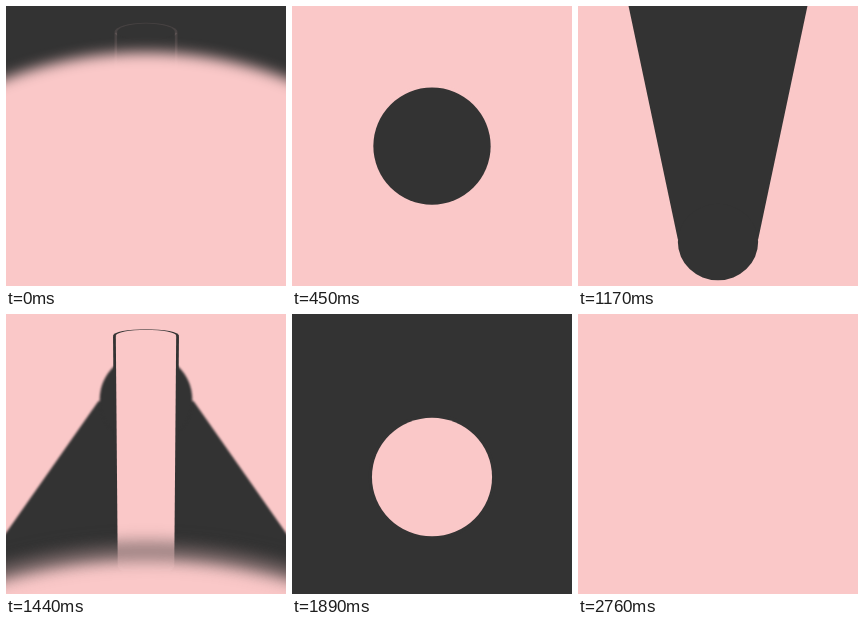
These frames come from a looping animation (280x280 px, 2820 ms). An HTML page with a canvas:

```html
<!DOCTYPE html>
<html lang="en">
<head>
<meta charset="utf-8">
<title>Tumbling cylinder</title>
<style>
html, body { margin: 0; width: 100%; height: 100%; overflow: hidden; background: #333; }
canvas { display: block; width: 280px; height: 280px; }
</style>
</head>
<body>
<canvas id="stage" width="280" height="280"></canvas>
<script>
const ctx = document.getElementById('stage').getContext('2d');
const DARK = '#333333', PINK = '#fac8c8';
const STEP = 30, HALF = 1410, COVERED = 480;
const MID = 140, FOCAL = MID / Math.tan(Math.PI / 9);

// The cylinder spins end over end while the camera closes in at one unit per ms.
const LENGTH = 663, RADIUS = 174, START = 2254, NEAR = 140;
const angleAt = t => (0.3 + 0.1994 * t) * Math.PI / 180;

// Perspective view of one end disc; side is 0 or 1
function endAt(t, side) {
  const angle = angleAt(t) + side * Math.PI;
  const sin = Math.sin(angle), cos = Math.cos(angle);
  const screenY = (y, depth) => MID + FOCAL * y / Math.max(1, depth);
  const depth = START - t - LENGTH * sin;
  const front = screenY(RADIUS * sin - LENGTH * cos, depth - RADIUS * cos);
  const back = screenY(-RADIUS * sin - LENGTH * cos, depth + RADIUS * cos);
  return {
    y: screenY(-LENGTH * cos, depth),
    cy: (front + back) / 2,
    rx: FOCAL * RADIUS / depth,
    ry: Math.abs(front - back) / 2,
    nearest: depth - RADIUS * Math.abs(cos),
    facing: front > back
  };
}

const endsAt = t => [endAt(t, 0), endAt(t, 1)];

function discPath(end, scale = 1) {
  ctx.beginPath();
  ctx.ellipse(MID, end.cy, end.rx * scale, end.ry * scale, 0, 0, 2 * Math.PI);
}

function fillDisc(end, color, scale) {
  discPath(end, scale);
  ctx.fillStyle = color;
  ctx.fill();
}

function strokeDisc(end, color, width) {
  discPath(end);
  ctx.strokeStyle = color;
  ctx.lineWidth = width;
  ctx.stroke();
}

function fillSides([a, b], color, scale) {
  ctx.fillStyle = color;
  ctx.beginPath();
  ctx.moveTo(MID - a.rx * scale, a.y);
  ctx.lineTo(MID + a.rx * scale, a.y);
  ctx.lineTo(MID + b.rx * scale, b.y);
  ctx.lineTo(MID - b.rx * scale, b.y);
  ctx.fill();
}

function fillBody(ends, color, scale) {
  fillSides(ends, color, scale);
  for (const end of ends) fillDisc(end, color, scale);
}

function blurred(radius, paint) {
  ctx.filter = `blur(${radius}px)`;
  paint();
  ctx.filter = 'none';
}

function drawCylinder(t, color, back) {
  const ends = endsAt(t);
  if (t < COVERED) {
    ctx.globalAlpha = Math.min(1, 0.1 + t / STEP);
    fillBody(ends, back, 1.06);
    ctx.globalAlpha = 1;
  }
  blurred(0.3, () => fillBody(ends, color, 0.97));
  for (const end of ends.filter(e => e.facing)) {
    strokeDisc(end, back, 0.11 * end.rx);
    fillDisc(end, color);
  }
}

// The near end is out of focus, and opens once the camera has passed its rim.
function drawNearEnd(end, color, back) {
  blurred(Math.min(9, 1100 / end.nearest), () => {
    if (end.nearest > NEAR) return fillDisc(end, back);
    fillDisc(end, color);
    ctx.globalAlpha = 0.6;
    strokeDisc(end, back, 16);
    ctx.globalAlpha = 1;
  });
}

function draw(time) {
  const loop = Math.floor(time / STEP) * STEP % (2 * HALF);
  const t = loop % HALF;
  const [color, back] = loop < HALF ? [DARK, PINK] : [PINK, DARK];
  const outer = t < COVERED && endsAt(t + HALF);
  ctx.fillStyle = outer ? color : back;
  ctx.fillRect(0, 0, 2 * MID, 2 * MID);
  if (outer) {
    blurred(1, () => {
      fillSides(outer, back, 1.03);
      fillDisc(outer[0], back);
    });
  }
  drawCylinder(t, color, back);
  if (outer) drawNearEnd(outer[1], color, back);
}

function tick(now) {
  draw(now);
  requestAnimationFrame(tick);
}
draw(0);
requestAnimationFrame(tick);
</script>
</body>
</html>
```
